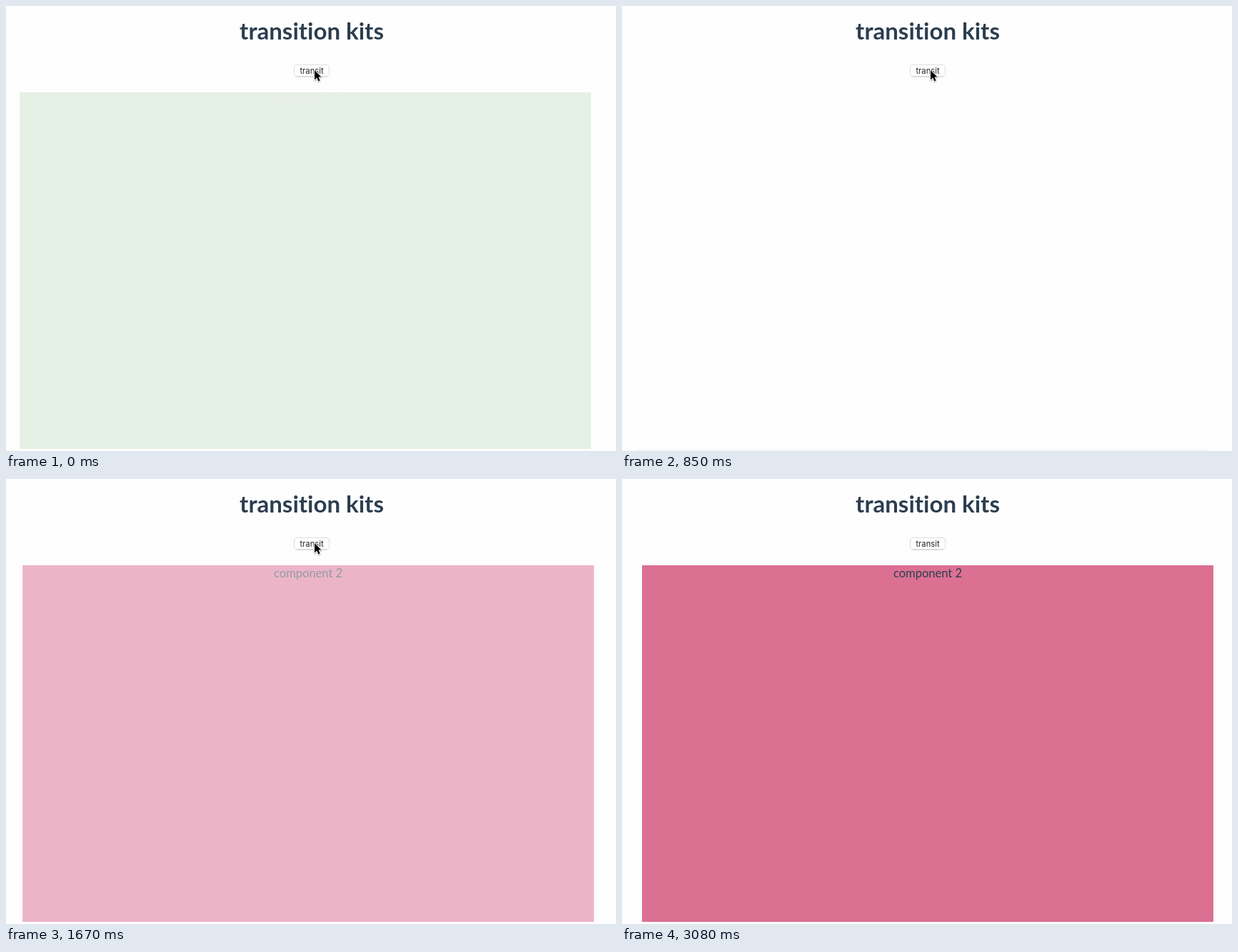
An HTML page with a canvas that plays this animation: 854 by 624 pixels, repeating every 3560 ms.

```html
<!DOCTYPE html>
<html lang="en">
<head>
<meta charset="utf-8">
<title>transition kits</title>
<style>
  html, body { margin: 0; width: 100%; height: 100%; overflow: hidden; background: #fefefe; }
  canvas { display: block; }
</style>
</head>
<body>
<canvas id="stage" width="854" height="624"></canvas>
<script>
const ctx = document.getElementById('stage').getContext('2d');
const LOOP = 3560;
const ENTER = 500;
const LEAVE = 33;
const FADE = 5.2;
const PAPER = [254, 254, 254];
const INK = [44, 62, 80];
const SANS = 'Lato, "Open Sans", sans-serif';
const GREEN = { color: [0, 128, 0], label: 'component 1' };
const PINK = { color: [219, 112, 147], label: 'component 2' };

const swaps = [
  { start: -12, from: GREEN, to: PINK },
  { start: 820, from: PINK, to: GREEN },
  { start: 1515, from: GREEN, to: PINK }
];

// The screen refreshes in bursts (first, last, intervals) and rests between them.
const bursts = [[0, 100, 1], [260, 490, 2], [850, 1280, 4],
  [1550, 2010, 4], [2130, 2310, 2], [2570, 3080, 6]];

function snap(time) {
  const [first, last, n] = bursts.findLast(b => b[0] <= time);
  const step = (last - first) / n;
  return first + step * Math.min(n, Math.floor((time - first) / step));
}

const clamp = v => Math.min(1, Math.max(0, v));
const progress = (t, a, b) => clamp((t - a) / (b - a));
const smooth = p => p * p * (3 - 2 * p);
const bezier = (a, b, u) => 3 * a * u * (1 - u) ** 2 + 3 * b * u * u * (1 - u) + u ** 3;

// CSS "ease": cubic-bezier(.25, .1, .25, 1)
function ease(x) {
  let lo = 0, hi = 1;
  for (let i = 0; i < 24; i++) {
    const mid = (lo + hi) / 2;
    if (bezier(.25, .25, mid) < x) lo = mid; else hi = mid;
  }
  return bezier(.1, 1, lo);
}

// Colour seen through a given opacity on the page
const tint = (color, alpha) =>
  `rgb(${color.map((c, i) => Math.round(PAPER[i] + (c - PAPER[i]) * alpha))})`;

function text(str, x, y, font, color) {
  ctx.font = font;
  ctx.fillStyle = color;
  ctx.fillText(str, x, y);
}

function panel(item, shown, top) {
  const x = 18 + 10 * shown;
  ctx.fillStyle = tint(item.color, shown);
  ctx.fillRect(x, top, 800, 500);
  text(item.label, x + 400, top + 16.5, `16.5px ${SANS}`, tint(INK, shown));
}

// While the old panel is still leaving, the new one sits below it.
function panels(t) {
  const { start, from, to } = swaps.findLast(s => s.start <= t);
  const age = t - start;
  const leaving = age < LEAVE;
  if (leaving) panel(from, Math.exp(-age / FADE), 121);
  panel(to, ease(clamp(age / ENTER)), leaving ? 621 : 121);
}

function button() {
  ctx.beginPath();
  ctx.roundRect(403.5, 82.5, 49, 16.5, 3.5);
  ctx.fillStyle = '#fff';
  ctx.fill();
  ctx.strokeStyle = '#dedede';
  ctx.lineWidth = 1;
  ctx.stroke();
  ctx.fillStyle = '#c4c4c4';
  ctx.fillRect(406, 98.6, 44, .8);
  text('transit', 428, 95, '11.2px Inter, "Liberation Sans", sans-serif', '#222');
}

// Sweeps from the button to the lower right, then drops off the stage.
function pointer(t) {
  const exit = progress(t, 2500, 3080);
  const x = 432 + 386 * smooth(progress(t, 1745, 2095)) + 14 * exit;
  const y = 89 + 416 * smooth(progress(t, 1780, 2175)) + 122 * exit ** 1.5;
  ctx.save();
  ctx.translate(x, y);
  ctx.beginPath();
  [[0, 1], [0, 14.5], [3.2, 11.6], [5.4, 16.4], [7.6, 15.5], [5.5, 10.6], [9.5, 10.6]]
    .forEach(p => ctx.lineTo(...p));
  ctx.closePath();
  ctx.lineJoin = 'round';
  ctx.lineWidth = 1.8;
  ctx.strokeStyle = '#fff';
  ctx.shadowColor = 'rgba(0,0,0,.35)';
  ctx.shadowBlur = 2;
  ctx.shadowOffsetY = 1;
  ctx.stroke();
  ctx.shadowColor = 'transparent';
  ctx.fillStyle = '#000';
  ctx.fill();
  ctx.restore();
}

function draw(time) {
  const t = snap(time);
  ctx.fillStyle = tint(PAPER, 1);
  ctx.fillRect(0, 0, 854, 624);
  text('transition kits', 428, 46.5, `bold 33px ${SANS}`, tint(INK, 1));
  button();
  panels(t);
  pointer(t);
}

ctx.textAlign = 'center';
ctx.letterSpacing = '0.01px'; // keeps "ti" from joining
const begin = performance.now();
function frame() {
  draw((performance.now() - begin) % LOOP);
  requestAnimationFrame(frame);
}
frame();
</script>
</body>
</html>
```
